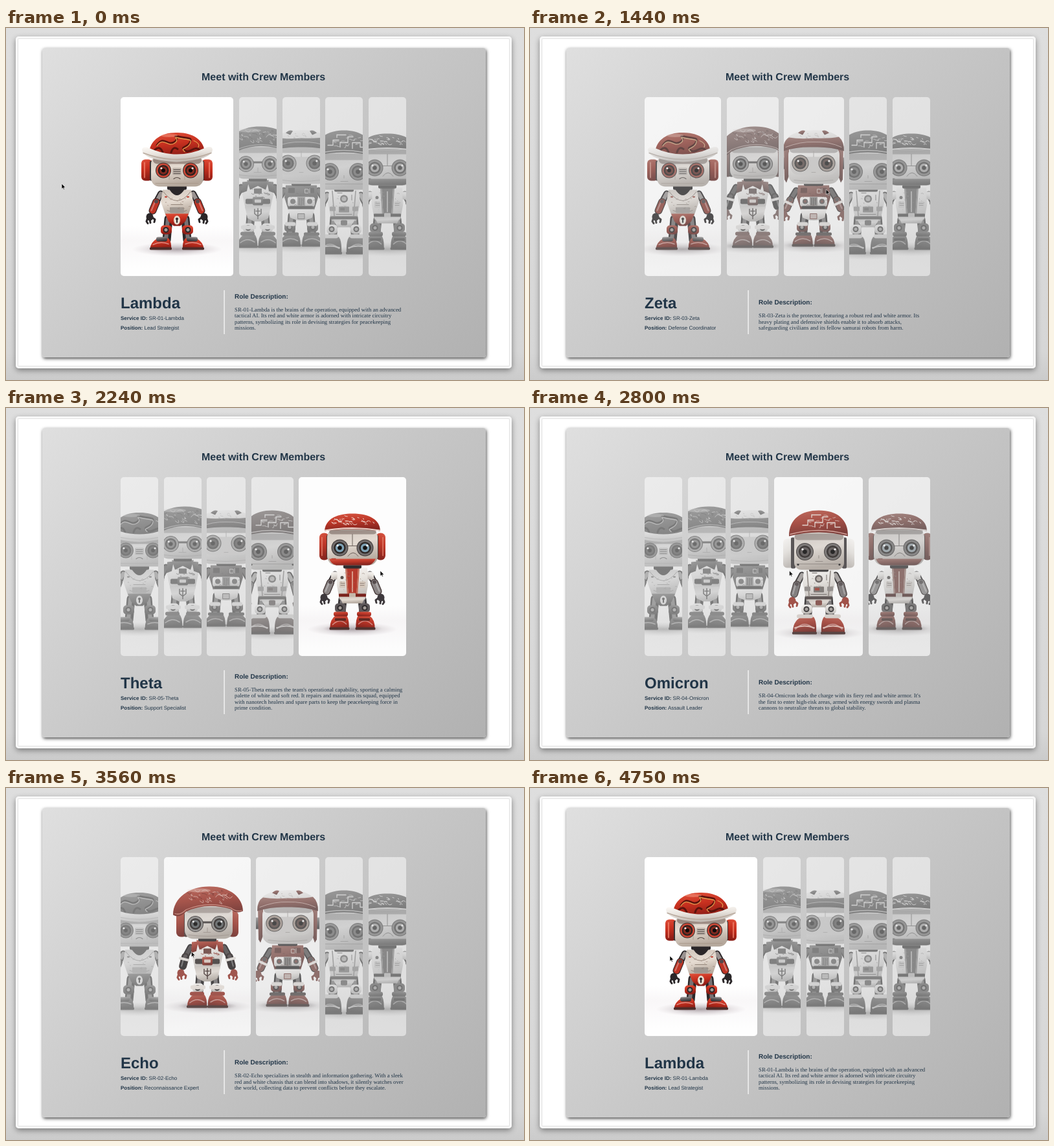
Animation, 800 px wide and 545 px high, one loop 4810 ms. Source, as an HTML page:

```html
<!DOCTYPE html>
<html lang="en">
<head>
<meta charset="utf-8">
<title>Crew Members</title>
<style>
html, body { margin: 0; width: 100%; height: 100%; overflow: hidden; }
#stage { position: relative; width: 800px; height: 545px; overflow: hidden; background: linear-gradient(#dedede, #d6d6d6 92%, #cbcbcb); }
#window { position: absolute; left: 15px; top: 13px; width: 766px; height: 514px; border-radius: 5px; background: #fff;
  box-shadow: 0 3px 9px rgba(0,0,0,.42), inset 0 0 0 3px #f8f8f8, inset 0 0 0 4px #e2e2e2; }
#panel { position: absolute; left: 56px; top: 31px; width: 685px; height: 479px; border-radius: 4px;
  background: linear-gradient(135deg, #dfdfdf, #c8c8c8 48%, #b1b1b1); box-shadow: 1px 2px 5px rgba(0,0,0,.7); }
#cards { position: absolute; left: 177px; top: 106.5px; width: 441px; height: 277px; display: flex; gap: 8.5px; }
.card { position: relative; flex: 1 1 0; min-width: 0; overflow: hidden; border-radius: 5px;
  background: linear-gradient(#fff 72%, #f9f7f8 80%, #fefefe 96%); }
.card svg { position: absolute; left: 50%; top: 0; margin-left: -87px; }
#over { position: absolute; left: 0; top: 0; text-rendering: geometricPrecision; fill: #213547;
  font-family: "Liberation Sans", Arial, sans-serif; }
#over .b { font-weight: 700; }
#desc { font: 8.8px "Liberation Serif", Georgia, serif; }
</style>
</head>
<body>
<div id="stage">
  <div id="window"></div>
  <div id="panel"></div>
  <svg width="0" height="0" style="position:absolute"><defs id="defs"></defs></svg>
  <div id="cards"></div>
  <svg id="over" width="800" height="545">
    <text class="b" x="397.6" y="81" font-size="16" text-anchor="middle">Meet with Crew Members</text>
    <text class="b" id="name" x="177" y="434" font-size="24"></text>
    <text x="177" y="452.3" font-size="8"><tspan class="b">Service ID:</tspan> <tspan id="sid"></tspan></text>
    <text x="177" y="467" font-size="8"><tspan class="b">Position:</tspan> <tspan id="pos"></tspan></text>
    <rect x="336.4" y="406" width="1.4" height="68" fill="#f4f4f4"/>
    <text class="b" id="role" x="353" font-size="10">Role Description:</text>
    <g id="desc"></g>
    <path id="cursor" d="M0 0V8.2L1.9 6.5 3.1 9.2 4.4 8.6 3.2 6 5.8 5.9Z" fill="#000" stroke="#fff" stroke-width=".6"/>
  </svg>
</div>
<script>
const $ = id => document.getElementById(id);

const crew = [
  ['Lambda', '01', 'Lead Strategist', [
    'SR-01-Lambda is the brains of the operation, equipped with an advanced',
    'tactical AI. Its red and white armor is adorned with intricate circuitry',
    'patterns, symbolizing its role in devising strategies for peacekeeping',
    'missions.']],
  ['Echo', '02', 'Reconnaissance Expert', [
    'SR-02-Echo specializes in stealth and information gathering. With a sleek',
    'red and white chassis that can blend into shadows, it silently watches over',
    'the world, collecting data to prevent conflicts before they escalate.']],
  ['Zeta', '03', 'Defense Coordinator', [
    'SR-03-Zeta is the protector, featuring a robust red and white armor. Its',
    'heavy plating and defensive shields enable it to absorb attacks,',
    'safeguarding civilians and its fellow samurai robots from harm.']],
  ['Omicron', '04', 'Assault Leader', [
    "SR-04-Omicron leads the charge with its fiery red and white armor. It's",
    'the first to enter high-risk areas, armed with energy swords and plasma',
    'cannons to neutralize threats to global stability.']],
  ['Theta', '05', 'Support Specialist', [
    "SR-05-Theta ensures the team's operational capability, sporting a calming",
    'palette of white and soft red. It repairs and maintains its squad, equipped',
    'with nanotech healers and spare parts to keep the peacekeeping force in',
    'prime condition.']]
];

// Shape helpers: x is measured from the robot's middle, y from the stage top
const P = (d, f) => `<path d="${d}" fill="${f}"/>`;
const L = (d, c, w = 1) => `<path d="${d}" fill="none" stroke="${c}" stroke-width="${w}" stroke-linecap="round" stroke-linejoin="round"/>`;
const E = (x, y, rx, ry, f) => `<ellipse cx="${x}" cy="${y}" rx="${rx}" ry="${ry}" fill="${f}"/>`;
const R = (x, y, w, h, r, f) => `<rect x="${x}" y="${y}" width="${w}" height="${h}" rx="${r}" fill="${f}"/>`;
const both = s => `${s}<g transform="scale(-1 1)">${s}</g>`;

const grad = (id, ...c) => `<linearGradient id="${id}" x2=".25" y2="1">` +
  c.map((k, i) => `<stop offset="${i / (c.length - 1)}" stop-color="${k}"/>`).join('') + '</linearGradient>';
$('defs').innerHTML = grad('red', '#e0503a', '#c7301f', '#8a1d16') + grad('cream', '#cfc4ba', '#e6dcd2', '#b5a89c') +
  grad('white', '#fdfaf7', '#e9e4de', '#c2bab3') + grad('steel', '#a29e9d', '#625e60', '#343236') +
  '<radialGradient id="shade"><stop stop-color="#6a5a62" stop-opacity=".55"/><stop offset="1" stop-color="#b0a0a8" stop-opacity="0"/></radialGradient>';
const red = 'url(#red)', cream = 'url(#cream)', white = 'url(#white)', steel = 'url(#steel)';
const dark = '#2b2729', wine = '#7d1c15', line = '#6f625a', rust = '#bd3425';

// Short seeded strokes spread over an ellipse: wear marks and hat patterns
function marks(seed, n, x, y, rx, ry, color, len = 4, w = .6, square = false) {
  const rnd = () => (seed = (seed * 16807) % 2147483647) / 2147483647;
  const f = v => v.toFixed(1);
  let d = '';
  for (let i = 0; i < n; i++) {
    const a = rnd() * 6.283, q = Math.sqrt(rnd());
    const u = (rnd() - .5) * 2 * len, v = (rnd() - .5) * 2 * len;
    d += `M${f(x + Math.cos(a) * q * rx)} ${f(y + Math.sin(a) * q * ry)}` +
      (square ? `h${f(u)}v${f(v / 2)}h${f(u / 2)}` : `q${f(u)} ${f(v)} ${f(u - v)} ${f(u / 3)}`);
  }
  return L(d, color, w);
}

const eye = (x, y, r, ring, iris) => E(x, y, r + 1, r + 1, '#3a3230') + E(x, y, r, r, ring) +
  E(x, y, r * .76, r * .76, '#29211f') + E(x, y, r * .56, r * .56, iris) +
  E(x, y, r * .27, r * .27, '#0c0a0a') + E(x - r * .28, y - r * .3, r * .13, r * .13, '#fff');

function arm(sx, sy, ex, ey, hx, hy, up, fore, hand) {
  const wx = ex + (hx - ex) * .55, wy = ey + (hy - ey) * .55;
  return L(`M${sx} ${sy}L${ex} ${ey}`, dark, 10) + L(`M${sx} ${sy}L${ex} ${ey}`, up, 6) +
    L(`M${ex} ${ey}L${wx} ${wy}`, '#3b2b2a', 12) + L(`M${ex} ${ey}L${wx} ${wy}`, fore, 9.5) +
    L(`M${ex - 2} ${ey}L${wx - 2} ${wy}`, '#ffffff55', 2) + E(ex, ey - 1, 3, 3, '#54484a') +
    E(hx, hy - 1, 5.5, 6, hand) +
    L(`M${hx - 3} ${hy}l-2 6l2 3M${hx} ${hy + 2}l1 6M${hx + 4} ${hy}l4 3l-1 4`, hand, 3);
}

const boot = (x, top, bottom, w, f) =>
  P(`M${x - w / 2} ${bottom}Q${x - w / 2 - 1} ${top + 7} ${x - 5} ${top}H${x + w / 2 - 4}Q${x + w / 2 + 1} ${top + 6} ${x + w / 2} ${bottom}Z`, f) +
  R(x - w / 2 - 1, bottom - 3, w + 2, 4, 1.5, '#4d2c29') +
  L(`M${x - w / 2 + 4} ${bottom - 7}Q${x} ${top + 4} ${x + w / 2 - 4} ${bottom - 8}`, '#ffffff70', 1.6);

const leg = (x, top, knee, foot, f) => L(`M${x + 3} ${top}L${x} ${foot}`, dark, 13) +
  L(`M${x + 2} ${top}L${x - 1} ${foot}`, '#777173', 6) + R(x - 9, knee - 7, 17, 14, 5, f) +
  E(x - 1, knee, 4.5, 4.5, dark) + E(x - 1, knee, 2.5, 2.5, '#a39a95');

const ground = y => E(0, y, 70, 11, 'url(#shade)') + both(E(24, y - 1, 22, 5, 'url(#shade)'));

function lambda() {
  return ground(342) +
    both(leg(-16, 295, 312, 328, red) + boot(-25, 325, 342, 32, red) + R(-32, 323, 17, 7, 3, steel)) +
    both(arm(-25, 256, -32, 269, -42, 293, '#9a9290', rust, dark)) +
    P('M-22 250H22L25 268L17 291H-17L-25 268Z', cream) + P('M-12 249Q0 268 12 249Z', dark) +
    L('M-21 253Q0 281 21 253M-15 282Q0 289 15 282M-9 273H9', '#8b7b70', .9) + both(R(-19, 260, 4, 2, 1, rust)) +
    R(-11, 277, 22, 9, 2, '#9f9790') +
    P('M-18 287H18L13 299L5 306H-5L-13 299Z', red) + E(0, 297, 5, 7, '#e8dcce') + E(0, 295, 2, 2, dark) + R(-1, 296, 2, 5, 0, dark) +
    R(-15, 243, 30, 7, 2, dark) +
    both(R(-55, 203, 17, 33, 6, red) + R(-42, 205, 5, 31, 2, '#3b3232') + L('M-50 208V231', '#f0806a', 1.6)) +
    R(-40, 197, 81, 48, 13, cream) + R(-37, 199, 75, 11, 8, '#4a302a70') +
    L('M-33 240H33M-12 211V234M12 211V234', '#a79788', .8) + R(-7, 216, 14, 11, 1.5, '#bcb1a8') +
    L('M-5 219H5M-5 222H5M-5 225H5', '#554d4a', 1) + L('M-5 233Q0 229 5 233', '#574b46', 1.2) +
    both(eye(-21, 220, 11, '#c94837', '#80291f')) +
    P('M-43 194C-42 171 -21 161 0 161.5C24 161 43 173 43 194Q0 208 -43 194Z', red) +
    L('M-31 181C-20 165 -15 183 -4 176S-11 165 4 168S24 169 20 177S4 183 12 189S27 180 36 189M-34 188q8 -7 12 4M-9 192q3 -10 10 -5', '#5b130d', 3) +
    L('M-31 182C-20 167 -15 185 -4 178S-11 167 4 170S24 171 20 179S4 185 12 191M26 174q10 4 7 10', '#e49a4f', 1.3) +
    E(-12, 166, 13, 2.4, '#ffb8a060') +
    P('M-54 188Q-53 182 -44 185Q0 205 44 185Q54 181 55 188Q55 203 0 207Q-53 204 -54 188Z', white) +
    L('M-52 193Q0 213 53 193', '#b8a99d', 1.4) + marks(31, 14, 0, 271, 20, 14, '#8e7669', 2);
}

function echo() {
  return ground(338) +
    both(leg(-14, 290, 309, 325, white) + R(-26, 305, 23, 6, 2, '#e9ded5') + boot(-16, 319, 339, 30, red) + R(-27, 315, 22, 6, 3, rust)) +
    both(arm(-26, 246, -34, 261, -41, 287, '#514a4b', dark, rust) + L('M-42 263L-30 266', '#e5ddd6', 4)) +
    P('M-23 236H23L24 257L19 280H-19L-24 257Z', white) + P('M-17 235H17L12 250L0 244L-12 250Z', red) +
    both(P('M-24 238L-14 237L-17 252L-25 255Z', red)) + R(-19, 264, 38, 8, 2, '#3e3634') + R(-8, 261, 16, 13, 2, red) +
    R(-5, 265, 10, 5, 1, '#e1c6b9') + marks(77, 18, 0, 256, 18, 9, '#b33a2d', 3, .9) + R(-6, 248, 12, 8, 1, '#7b3b33') +
    P('M-20 276H20L16 294L6 299H-6L-16 294Z', cream) + L('M0 279V295M-5 280v7l5 4l5 -4v-7M-3 283h6', '#49302c', 1.5) +
    R(-14, 231, 28, 6, 2, dark) +
    both(R(-48, 190, 17, 40, 7, red) + R(-36, 194, 6, 36, 2, '#503633')) +
    R(-35, 181, 74, 52, 13, cream) + R(-33, 184, 70, 9, 6, '#5d443e60') + L('M-29 227Q0 231 33 227M0 216v6M-6 223h11', '#9d8c80', .9) +
    R(-10, 206, 22, 3, 1, '#453d3a') + both(eye(-18.5, 210, 11.5, '#8b8885', '#5d6467')) +
    P('M-53 196C-53 169 -27 152 2 152C34 151 55 169 55 190Q44 195 36 187Q-2 176 -33 191Q-44 202 -53 196Z', red) +
    L('M-50 194Q-42 197 -33 188Q0 174 36 185Q45 192 53 189', '#eb7965', 1.3) +
    marks(15, 20, 1, 167, 38, 10, '#efb1a2', 9, .8) + marks(26, 11, 2, 167, 36, 9, '#8c1e16', 8, .8) + E(-13, 158, 18, 3, '#ffd0c060');
}

function zeta() {
  return ground(337) +
    both(leg(-17, 290, 308, 325, red) + R(-25, 300, 16, 6, 2, '#e7ddd3') + boot(-17, 318, 337, 31, red) + R(-28, 316, 24, 5, 2, '#53423f')) +
    both(arm(-27, 251, -36, 266, -46, 289, '#5d5657', rust, rust) + L('M-44 268L-33 273', '#eee2d8', 4)) +
    P('M-24 243H24L26 262L20 281H-20L-26 262Z', red) + R(-21, 261, 42, 15, 4, white) +
    both(E(-13, 268, 4, 4, '#594c49') + E(-13, 268, 2, 2, rust) + R(-20, 247, 10, 8, 1, '#8e241a')) +
    R(-6, 261, 12, 14, 1, '#8a817b') + L('M-3 263V273M0 263V273M3 263V273', '#373130', 1) +
    L('M6 249h5v6h-5zM13 248v7', '#e4b2a0', 1) + R(-18, 275, 36, 6, 1, dark) +
    P('M-20 280H20L17 293Q0 302 -17 293Z', white) + R(-5, 287, 10, 8, 1, '#d8a597') + L('M-5 287h10v8h-10z', rust, 1) +
    R(-15, 239, 30, 5, 2, dark) +
    both(R(-54, 200, 12, 18, 4, steel) + R(-55, 205, 4, 8, 2, '#a2816a') + P('M-46 184H-38V228L-42 239L-45 234Z', red)) +
    R(-39, 181, 79, 60, 15, white) + R(-37, 183, 75, 10, 6, '#4b343060') + R(-36, 199, 72, 28, 13, '#d0c9c2') +
    L('M-30 235Q0 239 30 235M-3 223h6M0 190v9', '#a3988f', .9) + both(eye(-20.5, 209, 12, '#b58b70', '#6a3325')) +
    P('M-47 187C-47 169 -30 158 -5 158C25 155 47 167 47 187Q25 178 0 179Q-25 178 -47 187Z', white) +
    P('M-47 190Q-47 174 -38 169Q-21 172 0 170Q25 171 39 168Q47 175 47 190Q25 183 0 184Q-25 183 -47 190Z', red) +
    both(P('M-24 162Q-18 156 -13 159L-17 165Z', red)) + L('M-43 184Q-20 175 0 176Q24 175 43 184', '#ef8f7d', 1) +
    marks(91, 22, 0, 260, 25, 16, '#852b22', 2) + marks(8, 10, 0, 166, 30, 6, '#b8aaa2', 4);
}

function omicron() {
  return ground(348) +
    both(leg(-18, 293, 311, 328, white) + boot(-22, 323, 349, 36, red) + R(-34, 319, 25, 6, 3, '#dcd2ca') + L('M-37 340Q-22 334 -7 340', '#f0b6a9', 2)) +
    both(arm(-26, 258, -34, 273, -41, 299, '#a69e9b', '#777172', rust)) +
    P('M-23 250H23L25 270L19 298H-19L-25 270Z', white) + both(L('M-18 252L-15 290', '#8a7e76', 1.6) + R(-22, 276, 9, 7, 1, '#8f8884')) +
    E(0, 264, 6, 6, '#5e5552') + E(0, 264, 3.6, 3.6, '#b9aca3') + R(-8, 276, 16, 9, 1, '#766c68') + R(-6, 278, 7, 4, 0, rust) +
    L('M-10 255h7M12 258v8M-12 288H12', '#675d58', 1) + R(-20, 291, 40, 5, 1, '#504341') +
    P('M-17 296H17L10 308H-10Z', cream) + R(-5, 297, 10, 8, 2, '#944238') + R(-15, 247, 30, 6, 2, dark) +
    both(R(-55, 202, 17, 45, 6, white) + R(-43, 200, 7, 48, 2, '#464042')) +
    R(-38, 190, 77, 60, 11, cream) + R(-37, 194, 75, 10, 5, '#4e373260') + L('M-34 241H34M-5 237H6M0 228v4', '#8c7f76', .9) +
    both(eye(-21.5, 222, 12.5, '#716b69', '#5b5251') + E(-32, 242, 1.6, 1.6, dark)) +
    P('M-46 198C-46 171 -27 158 0 158C28 158 46 172 45 198Q0 186 -46 198Z', red) +
    L('M-44 195Q0 183 43 195', '#ef9b8c', 1.5) + L('M-25 181h8v-8h9M-6 184v-7h12v-9h8M13 186v-9h12v7h8M3 165h-14v4', '#edd5cb', 1.3) +
    marks(58, 18, 0, 174, 32, 9, '#edc5ba', 6, .7, true) + marks(61, 18, 0, 275, 21, 19, '#8f7e75', 2);
}

function theta() {
  return ground(342) +
    both(leg(-18, 296, 309, 326, '#5a5355') + boot(-20, 320, 342, 29, red) + R(-29, 315, 22, 7, 3, red) + R(-27, 325, 17, 4, 1, '#5e211b')) +
    both(arm(-27, 257, -34, 270, -44, 294, '#e7ded8', '#898383', '#393438') + R(-33, 253, 13, 12, 4, white)) +
    P('M-23 247H23L24 274L20 296H-20L-24 274Z', white) + P('M-9 247H9L6 292H-6Z', rust) +
    both(L('M-10 248L-7 291', '#c96851', 2) + R(-20, 268, 9, 10, 1, '#d5c6b9') + L('M-18 271h6M-18 274h6', '#84736a', .8)) +
    L('M0 253V284', '#e5b09c', 1.6) + E(-16, 262, 2.5, 2.5, '#554b47') + R(-21, 287, 42, 5, 1, wine) + R(-5, 286, 10, 7, 1, '#c6b6a7') +
    P('M-20 292H20L15 302H-15Z', cream) + R(-14, 242, 28, 6, 2, dark) +
    both(R(-51, 193, 15, 42, 7, red) + R(-40, 196, 5, 37, 2, '#4b302c') + L('M-47 200V228', '#ee8069', 1.3)) +
    R(-39, 186, 78, 57, 14, cream) + P('M-36 233H36Q31 243 23 243H-23Q-32 243 -36 233Z', red) + R(-36, 188, 73, 7, 5, '#513b3670') +
    L('M0 195V212M-7 229Q1 218 9 229M-8 213h16', '#6b5e57', 1) + both(eye(-19.5, 216, 12, '#6d6867', '#78a0b5')) + L('M-32 233h6', rust, 1.4) +
    P('M-43 190C-42 172 -25 163 0 163C27 163 43 173 43 190Q0 184 -43 190Z', red) + L('M-42 189Q0 182 42 189', '#f1d8ce', 2) +
    marks(42, 40, 0, 175, 32, 8, '#f3d8ce', 5, .9) + marks(67, 14, 0, 270, 22, 20, '#8d7b71', 2);
}

const cards = [lambda, echo, zeta, omicron, theta].map(draw => {
  const el = document.createElement('div');
  el.className = 'card';
  el.innerHTML = `<svg width="174" height="277" viewBox="-87 106.5 174 277">${draw()}</svg>`;
  return $('cards').appendChild(el);
});

// Motion: [time, selected card] and cursor points [time, x, y]
const LOOP = 4810, STEP = 40, GROW = 500;
const picks = [[0, 0], [620, 1], [1120, 0], [1340, 2], [1660, 3], [1905, 4], [2600, 3], [2950, 2], [3370, 1], [3970, 0]];
const track = [[0, 86, 241], [200, 86, 241], [480, 404, 406], [600, 404, 406], [640, 402, 382], [1040, 371, 249],
  [1340, 440, 250], [1660, 495, 249], [1800, 508, 249], [1905, 560, 250], [2240, 578, 252], [2480, 576, 252],
  [2600, 444, 252], [2950, 368, 252], [3320, 351, 250], [3370, 302, 252], [3880, 260, 256], [3970, 235, 258],
  [4080, 217.5, 259], [4400, 216, 260]];

// cubic-bezier(.25, .1, .25, 1)
function ease(x) {
  if (x >= 1) return 1;
  let lo = 0, hi = 1, s = .5;
  for (let i = 0; i < 20; i++) {
    s = (lo + hi) / 2;
    const at = .75 * s * (1 - s) + s * s * s;
    at < x ? lo = s : hi = s;
  }
  return .3 * s * (1 - s) ** 2 + 3 * s * s * (1 - s) + s ** 3;
}

function weights(t) {
  let w = [1, 0, 0, 0, 0], now = 0;
  picks.forEach(([at, sel], i) => {
    if (at > t) return;
    const end = Math.min(t, i + 1 < picks.length ? picks[i + 1][0] : t);
    const k = ease((end - at) / GROW);
    w = w.map((v, j) => v + ((j === sel) - v) * k);
    now = sel;
  });
  return [w, now];
}

function cursorAt(t) {
  const i = track.findIndex(p => p[0] > t);
  if (i < 0) return track[track.length - 1].slice(1);
  const [a, x, y] = track[i - 1], [b, u, v] = track[i], k = (t - a) / (b - a);
  return [x + (u - x) * k, y + (v - y) * k];
}

let shown = -1;
function label(n) {
  if (n === shown) return;
  shown = n;
  const [name, num, job, lines] = crew[n];
  $('name').textContent = name;
  $('sid').textContent = `SR-${num}-${name}`;
  $('pos').textContent = job;
  const first = 467 - 9.3 * (lines.length - 1);
  $('role').setAttribute('y', first - 20.1);
  $('desc').innerHTML = lines.map((s, i) => `<text x="353" y="${first + 9.3 * i}">${s}</text>`).join('');
}

function frame() {
  const now = performance.now() % LOOP, t = now - now % STEP;
  const [w, sel] = weights(t);
  cards.forEach((el, i) => {
    el.style.flexGrow = 1 + 2 * w[i];
    el.style.filter = `grayscale(${1 - w[i]}) opacity(${.5 + .5 * w[i]})`;
  });
  label(sel);
  $('cursor').setAttribute('transform', `translate(${cursorAt(t)})`);
  requestAnimationFrame(frame);
}
frame();
</script>
</body>
</html>
```
